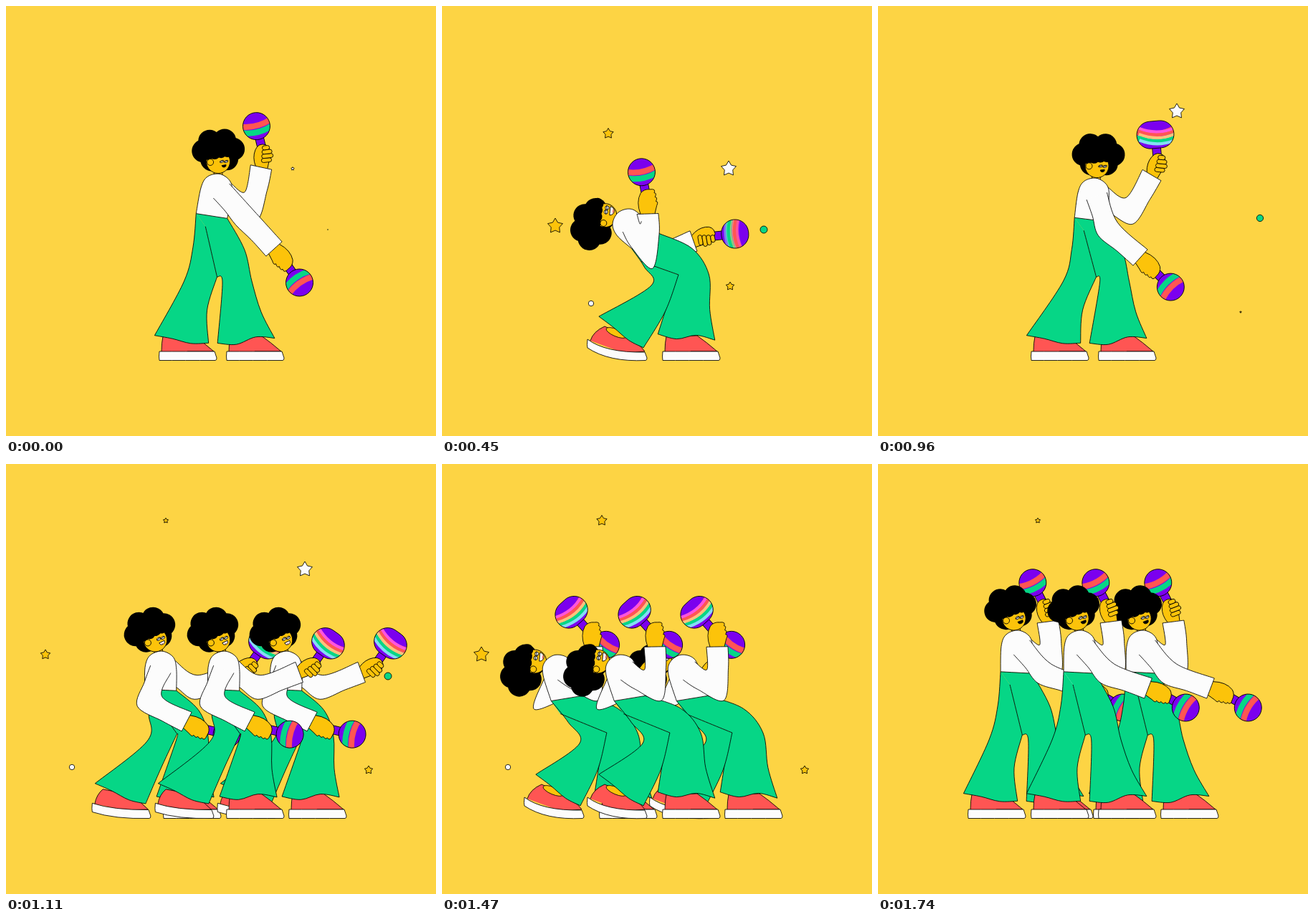
An HTML page with a canvas for the animation above (1.77 s loop, 600 by 600 pixels).

```html
<!DOCTYPE html>
<html lang="en">
<head>
<meta charset="utf-8">
<title>Maraca dance</title>
<style>
html, body { margin: 0; width: 100%; height: 100%; overflow: hidden; background: #fdd444; }
canvas { display: block; width: 100vw; height: 100vh; }
</style>
</head>
<body>
<canvas id="stage" width="600" height="600"></canvas>
<script>
const ctx = document.getElementById('stage').getContext('2d');
const LOOP = 1770, STEP = 30, BEAT = 900, TRIO_AT = 1110, LINE = .85;
const BG = '#fdd444', SKIN = '#fcc30a', WHITE = '#fcfcfc', GREEN = '#06d686',
      CORAL = '#ff5553', PURPLE = '#7b00ee', INK = '#000';

// Joint paths over one beat; elbows, knees, head and clothes follow from them.
const KEYS = [0, 60, 330, 450, 570, 690, 840];
const shoulderPath = path([296,253], [303,259], [292,295], [262,302], [252,285], [257,262], [284,251]);
const hipPath = path([287,293], [296,298], [298,326], [284,328], [262,327], [262,303], [281,291]);
// Wrist position and maraca angle in degrees.
const nearPath = path([374,339,55], [366,351,45], [315,339,-31], [287,290,-101],
                      [297,255,-132], [346,258,-65], [377,313,30]);
const farPath = path([356,225,-104], [382,236,-95], [395,326,-23], [351,328,-6],
                     [278,296,-54], [281,249,-109], [325,220,-117]);

// kind, size, start and end within a beat
const PIECES = [['white', 11, -15, 560], ['gold', 11, 165, 800], ['gold', 7.5, 175, 875],
                ['gold', 6, 45, 810], ['dot', 3.7, 58, 790], ['green', 5, -5, 560]];
const SPOTS = [
  [[400,227], [158,307], [232,178], [402,391], [208,415], [449,312]],
  [[417,147], [55,266], [223,79], [506,427], [92,423], [533,296]]];

// Smooth cyclic interpolation between key points.
function path(...rows) {
  const n = KEYS.length;
  const at = i => KEYS[(i + n) % n] + BEAT * Math.floor(i / n);
  const row = i => rows[(i + n) % n];
  const slope = (i, k) => {
    const h0 = at(i) - at(i - 1), h1 = at(i + 1) - at(i);
    const d0 = (row(i)[k] - row(i - 1)[k]) / h0, d1 = (row(i + 1)[k] - row(i)[k]) / h1;
    return (d0 * h1 + d1 * h0) / (h0 + h1);
  };
  return u => {
    let i = n - 1;
    while (KEYS[i] > u) i--;
    const h = at(i + 1) - at(i), s = (u - at(i)) / h, s2 = s * s, s3 = s2 * s;
    return row(i).map((v, k) =>
      v * (2 * s3 - 3 * s2 + 1) + row(i + 1)[k] * (3 * s2 - 2 * s3) +
      slope(i, k) * h * (s3 - 2 * s2 + s) + slope(i + 1, k) * h * (s3 - s2));
  };
}

const clamp = v => Math.max(0, Math.min(1, v));
const rad = deg => deg * Math.PI / 180;
const add = (p, x, y) => [p[0] + x, p[1] + y];
const along = (p, dir, d) => add(p, dir[0] * d, dir[1] * d);
const lerp = (a, b, k = .5) => [a[0] + (b[0] - a[0]) * k, a[1] + (b[1] - a[1]) * k];
const polar = (p, a, r) => add(p, Math.cos(a) * r, Math.sin(a) * r);
const unit = (x, y) => { const d = Math.hypot(x, y) || 1; return [x / d, y / d]; };
const normal = (a, b) => unit(a[1] - b[1], b[0] - a[0]);

function spline(p) {
  for (let i = 0; i < p.length - 1; i++) {
    const a = p[i - 1] || p[i], b = p[i], c = p[i + 1], d = p[i + 2] || c;
    ctx.bezierCurveTo(b[0] + (c[0] - a[0]) / 6, b[1] + (c[1] - a[1]) / 6,
                      c[0] - (d[0] - b[0]) / 6, c[1] - (d[1] - b[1]) / 6, c[0], c[1]);
  }
}

// Fills the joined runs, then inks each run; extra points are filled only.
function outline(color, runs, extra = []) {
  ctx.beginPath();
  for (const r of runs) { ctx.lineTo(...r[0]); spline(r); }
  for (const p of extra) ctx.lineTo(...p);
  ctx.fillStyle = color;
  ctx.fill();
  ctx.beginPath();
  for (const r of runs) { ctx.moveTo(...r[0]); spline(r); }
  ctx.stroke();
}

function paint(color) {
  ctx.fillStyle = color;
  ctx.fill();
  ctx.stroke();
}

function disc(x, y, r, color, inked) {
  ctx.beginPath();
  ctx.arc(x, y, r, 0, 7);
  ctx.fillStyle = color;
  ctx.fill();
  if (inked) ctx.stroke();
}

function bar(a, b, width, color) {
  for (const [w, c] of [[width + 2 * LINE, INK], [width, color]]) {
    ctx.beginPath();
    ctx.moveTo(...a);
    ctx.lineTo(...b);
    ctx.lineWidth = w;
    ctx.strokeStyle = c;
    ctx.stroke();
  }
  ctx.lineWidth = LINE;
  ctx.strokeStyle = INK;
}

function local([x, y], angle, draw) {
  ctx.save();
  ctx.translate(x, y);
  ctx.rotate(angle);
  draw();
  ctx.restore();
}

function stripe(x, width, color) {
  ctx.beginPath();
  ctx.moveTo(x + 7, -30);
  ctx.quadraticCurveTo(x - 8, 0, x + 7, 30);
  ctx.lineWidth = width;
  ctx.strokeStyle = color;
  ctx.stroke();
}

// The head stretches sideways by the smear and shows blended stripes.
function maraca(hand, axis, smear) {
  bar(hand, polar(hand, axis, 30), 11, PURPLE);
  local(polar(hand, axis, 42), axis, () => {
    const body = () => {
      ctx.beginPath();
      ctx.arc(0, smear, 19, 0, Math.PI);
      ctx.arc(0, -smear, 19, Math.PI, 0);
      ctx.closePath();
    };
    ctx.save();
    body();
    ctx.fillStyle = PURPLE;
    ctx.fill();
    ctx.clip();
    stripe(1, 8, CORAL);
    stripe(-8, 8, GREEN);
    ctx.globalAlpha = clamp(smear / 2);
    ctx.translate(0, smear);
    ['#ff55dc', CORAL, '#ffc27c', GREEN, '#86dcf5'].forEach((c, i) => stripe(4 - 4.2 * i, 4.2, c));
    ctx.restore();
    body();
    ctx.stroke();
  });
}

function fist(turn) {
  ctx.beginPath();
  ctx.moveTo(-17, -8);
  ctx.quadraticCurveTo(-6, -15, 5, -13);
  ctx.quadraticCurveTo(16, -11, 15, 0);
  ctx.lineTo(8, 9);
  ctx.lineTo(-17, 9);
  paint(SKIN);
  ctx.rotate(turn * .7);
  for (let i = 0; i < 4; i++) {
    ctx.beginPath();
    ctx.roundRect(-10 + i * 5.8, -4 + i, 5.8, 12 + 4 * Math.sin(i + .6), 2.9);
    paint(SKIN);
  }
}

function backOfHand() {
  ctx.beginPath();
  ctx.moveTo(-17, -10);
  ctx.quadraticCurveTo(0, -16, 12, -9);
  ctx.quadraticCurveTo(18, -4, 17, 4);
  for (let i = 0; i < 4; i++) ctx.quadraticCurveTo(18 - 6 * i, 13 + i, 12 - 6 * i, 10 + i);
  ctx.lineTo(-17, 10);
  paint(SKIN);
}

// Two-bone reach: the elbow lies on the clockwise side of the line s-w.
function elbow(s, w, l1, l2) {
  const dx = w[0] - s[0], dy = w[1] - s[1], d = Math.hypot(dx, dy);
  const a = (l1 * l1 - l2 * l2 + d * d) / (2 * d), h = Math.sqrt(Math.max(0, l1 * l1 - a * a));
  return add(s, (dx * a - dy * h) / d, (dy * a + dx * h) / d);
}

function arm(shoulder, [x, y, deg], l1, l2, smear, drawHand) {
  const half = 15, w = [x, y], e = elbow(shoulder, w, l1, l2), s = lerp(shoulder, e, .12);
  const n1 = normal(s, e), n2 = normal(e, w), sum = [n1[0] + n2[0], n1[1] + n2[1]];
  const b = unit(...sum), miter = Math.min(3.2, 2 / Math.hypot(...sum));
  const dir = Math.atan2(w[1] - e[1], w[0] - e[0]), hand = polar(w, dir, 17), axis = rad(deg);
  maraca(hand, axis, smear);
  local(hand, dir, () => drawHand(Math.atan2(Math.sin(axis - dir), Math.cos(axis - dir))));
  const outer = [along(s, n1, half), along(lerp(s, e), n1, half), along(e, b, half + 2),
                 along(lerp(e, w), n2, half), along(w, n2, half)];
  const inner = [along(w, n2, -half), along(e, b, -half * miter), along(s, n1, -half)];
  outline(WHITE, [outer, [outer[4], inner[0]], inner]);
}

function face(open) {
  disc(0, 0, 16.5, SKIN, true);
  for (let i = 0; i < 4; i++) disc(-14 + 9 * i, -12 + 2 * Math.cos(i), 8, INK);
  disc(-11, 1, 4.5, SKIN, true);
  for (const x of [5, 11]) {
    ctx.beginPath();
    ctx.ellipse(x, 0, 2.8, 1.5 + open, -.3, 0, 7);
    paint(WHITE);
    ctx.beginPath();
    ctx.moveTo(x - 3, 1);
    ctx.lineTo(x + 3, -1.5);
    ctx.stroke();
  }
  const r = 3 + 3 * open;
  ctx.beginPath();
  ctx.arc(8, 5, r, -.2, 2.95);
  ctx.closePath();
  paint(open > .3 ? WHITE : INK);
  if (open > .3) {
    ctx.beginPath();
    ctx.arc(8, 5, r - 1, .7, 2.1);
    ctx.closePath();
    ctx.fillStyle = CORAL;
    ctx.fill();
  }
}

// The head swings back and up around the shoulder.
function drawHead(shoulder, turn) {
  const tilt = rad(-37 + 41 * Math.cos(turn - rad(25)));
  const hair = polar(shoulder, tilt * 1.25 - Math.PI / 2, 52);
  const chin = polar(shoulder, tilt - Math.PI / 2, 36);
  local(hair, tilt, () => {
    disc(0, 0, 24, INK);
    for (let i = 0; i < 6; i++) {
      const a = rad(-125 + 60 * i);
      disc(21 * Math.cos(a), 15 * Math.sin(a), 16, INK);
    }
  });
  bar(chin, shoulder, 11, SKIN);
  local(chin, tilt, () => face(clamp(-tilt / .8)));
}

function shoe(x, lift) {
  const up = (a, b) => a + (b - a) * lift;
  local([x, 0], 0, () => {
    ctx.beginPath();
    ctx.moveTo(up(4, -6), up(482, 467));
    ctx.quadraticCurveTo(up(4, -2), up(470, 454), up(6, 14), up(461, 447));
    ctx.lineTo(up(49, 46), up(460, 462));
    ctx.quadraticCurveTo(up(62, 62), up(469, 471), up(77, 70), 482);
    ctx.lineTo(40, up(482, 484));
    paint(CORAL);
    if (lift > .1) {
      ctx.beginPath();
      ctx.ellipse(30, 456, 15, 5 * lift, .4, 0, 7);
      paint(SKIN);
    }
    ctx.beginPath();
    ctx.moveTo(up(1, -10), up(482, 465));
    ctx.quadraticCurveTo(up(35, 15), up(482, 484), up(78, 70), up(482, 483));
    ctx.lineTo(up(81, 73), 491);
    ctx.quadraticCurveTo(up(81, 73), 494.5, up(79, 71), 494.5);
    ctx.quadraticCurveTo(up(35, 20), up(494.5, 497), up(1, -10), up(494.5, 477));
    ctx.quadraticCurveTo(up(0, -11), up(490, 474), up(1, -10), up(482, 465));
    paint(WHITE);
  });
}

const wave = (a, b, k1, k2) => [a, add(lerp(a, b, .33), 0, k1), add(lerp(a, b, .67), 0, k2), b];

// Knees go forward as the hips sink.
function trousers(hip, waistL, waistR, lift) {
  const sink = hip[1] - 288, half = 23 - 4 * lift;
  const nearHem = [245 + 5 * lift, 465 - 10 * lift], farHem = [335 + 6 * lift, 467 - 5 * lift];
  const nearKnee = (hip[0] + nearHem[0]) / 2 + 1.1 * sink;
  const farKnee = (hip[0] + farHem[0]) / 2 + 8 + .6 * sink;

  const tiltN = rad(8 + 27 * lift), heel = polar(nearHem, tiltN, -38), toe = polar(nearHem, tiltN, 38);
  const back = [nearKnee - half, 384 + 6 * lift], front = [nearKnee + half, 378 - 3 * lift];
  const crease = add(waistL, 13, 18);

  const tiltF = rad(-5 + 11 * lift), heelF = polar(farHem, tiltF, -40), toeF = polar(farHem, tiltF, 40);
  const shin = [farKnee + 21 + 7 * lift, 384 - 9 * lift], calf = [farKnee - 20, 386];

  outline(GREEN, [
    [waistR, add(lerp(waistR, shin), 7 + 4 * lift, -8 * lift), shin, add(lerp(shin, toeF), -3, 3), toeF],
    wave(toeF, heelF, -4, 4), [heelF, calf, front]], [crease, waistL]);
  outline(GREEN, [
    [waistL, add(lerp(waistL, back), 4, 0), back, heel], wave(heel, toe, 1, 4),
    [toe, add(lerp(toe, front), -8 + 14 * lift, 0), front], [front, crease]]);
}

function dancer(u, dx) {
  const s = shoulderPath(u), hip = hipPath(u), turn = u / BEAT * 2 * Math.PI;
  const lean = Math.atan2(s[0] - hip[0], hip[1] - s[1]);
  const waistL = polar(hip, lean * .7, -22), waistR = polar(hip, lean * .7, 22);
  const lift = clamp((hip[1] - 303) / 24);
  const farSmear = 7 * clamp((u - 10) / 50) * clamp((520 - u) / 460);
  const nearSmear = 10 * clamp((u - 450) / 240) * clamp((760 - u) / 60);

  local([dx, 0], 0, () => {
    arm(add(s, 5, 4), farPath(u), 50, 60, farSmear, fist);
    drawHead(s, turn);
    shoe(307, 0);
    shoe(213, lift);
    trousers(hip, waistL, waistR, lift);
    const top = add(s, -2, 3), round = [];
    for (let a = -95; a <= 95; a += 47.5) round.push(polar(top, lean + rad(a - 90), 22));
    outline(WHITE, [[waistL, ...round, waistR], [waistR, waistL]]);
    arm(s, nearPath(u), 55, 60, nearSmear, backOfHand);
  });
}

function star(x, y, r, color) {
  ctx.beginPath();
  for (let i = 0; i < 10; i++) ctx.lineTo(...polar([x, y], (i / 5 - .5) * Math.PI, i % 2 ? r * .55 : r));
  ctx.closePath();
  paint(color);
}

function confetti(spots, u) {
  PIECES.forEach(([kind, size, start, end], i) => {
    const r = size * clamp(Math.min(u - start, end - u) / 70), [x, y] = spots[i];
    if (r < .3) return;
    if (kind === 'dot') disc(x, y, r, WHITE, true);
    else if (kind === 'green') disc(x, y, r, GREEN, true);
    else star(x, y, r, kind === 'gold' ? SKIN : WHITE);
  });
}

function frame() {
  const t = Math.floor(performance.now() % LOOP / STEP) * STEP, u = t % BEAT;
  ctx.fillStyle = BG;
  ctx.fillRect(0, 0, 600, 600);
  ctx.lineWidth = LINE;
  ctx.lineJoin = 'round';
  ctx.strokeStyle = INK;
  const places = t < TRIO_AT ? [0] : [-88, 87, 0];
  for (const dx of places) dancer(u, dx);
  confetti(SPOTS[t < BEAT ? 0 : 1], u);
  requestAnimationFrame(frame);
}
frame();
</script>
</body>
</html>
```
